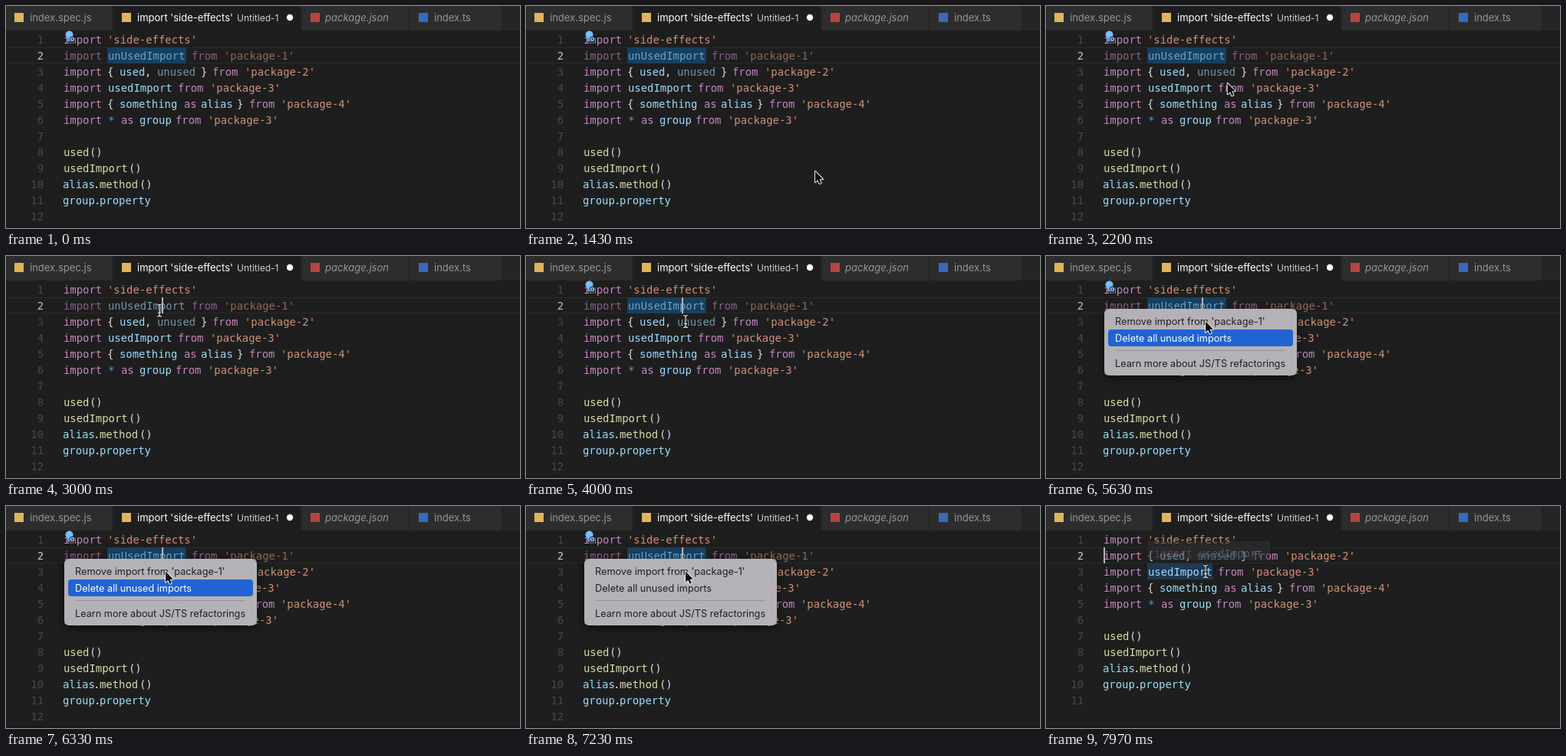
An HTML page with a canvas for the animation above (8000 ms loop, 670 px wide and 290 px high).

```html
<!DOCTYPE html>
<html lang="en">
<head>
<meta charset="utf-8">
<title>Remove unused imports</title>
<style>
  html, body { margin: 0; width: 100%; height: 100%; overflow: hidden; background: #1e1e1e; }
  canvas { display: block; width: 670px; height: 290px; }
</style>
</head>
<body>
<canvas id="stage"></canvas>
<script>
const W = 670, H = 290, LOOP = 8000, ROW = 21;
const CODE = '13.9px "DejaVu Sans Mono", monospace';
const UI = 'Inter, sans-serif';
const COLOR = { k: '#c586c0', s: '#ce9178', v: '#9cdcfe', f: '#dcdcaa', p: '#dcdcdc', o: '#569cd6' };

// Moments of the story, in ms
const ENTER = 1120, MOVE = 1600, ARRIVE = 2450, CLICK = 2850, MARK = 3110, BULB = 3170,
      OPEN = 4180, SECOND = 5500, BLINK = 7200, CLOSE = 7340, CLOSED = 7500, EDIT = 7600, HOVER = 7930;

// Tokens: x, text, colour key, optional "unused" flag
const LINES = [
  [[75, 'import', 'k'], [132, "'side-effects'", 's']],
  [[75, 'import', 'k', 1], [133, 'unUsedImport', 'v', 1], [242, 'from', 'k', 1], [284, "'package-1'", 's', 1]],
  [[75, 'import', 'k'], [132, '{', 'p'], [148, 'used', 'v'], [181, ',', 'p'], [197, 'unused', 'v', 1],
   [254, '}', 'p'], [269, 'from', 'k'], [311, "'package-2'", 's']],
  [[75, 'import', 'k'], [133, 'usedImport', 'v'], [224, 'from', 'k'], [266, "'package-3'", 's']],
  [[75, 'import', 'k'], [132, '{', 'p'], [148, 'something', 'v'], [232, 'as', 'k'], [254, 'alias', 'v'],
   [301, '}', 'p'], [317, 'from', 'k'], [358, "'package-4'", 's']],
  [[75, 'import', 'k'], [133, '*', 'o'], [150, 'as', 'k'], [174, 'group', 'v'], [221, 'from', 'k'],
   [263, "'package-3'", 's']],
  [],
  [[75, 'used', 'f'], [109, '()', 'p']],
  [[75, 'usedImport', 'f'], [160, '()', 'p']],
  [[74, 'alias', 'v'], [114, '.', 'p'], [122, 'method', 'f'], [174, '()', 'p']],
  [[74, 'group', 'v'], [115, '.', 'p'], [122, 'property', 'v']],
  []
];

const canvas = document.getElementById('stage');
const ctx = canvas.getContext('2d');
const ratio = window.devicePixelRatio || 1;
canvas.width = W * ratio;
canvas.height = H * ratio;

function rect(x, y, w, h, color) {
  ctx.fillStyle = color;
  ctx.fillRect(x, y, w, h);
}

function round(x, y, w, h, r, color) {
  ctx.fillStyle = color;
  ctx.beginPath();
  ctx.roundRect(x, y, w, h, r);
  ctx.fill();
}

function circle(x, y, r, color) {
  ctx.fillStyle = color;
  ctx.beginPath();
  ctx.arc(x, y, r, 0, 7);
  ctx.fill();
}

function text(string, x, y, font, color, align = 'left') {
  ctx.font = font;
  ctx.fillStyle = color;
  ctx.textAlign = align;
  ctx.fillText(string, x, y);
}

const clamp = v => Math.max(0, Math.min(1, v));
const progress = (t, from, to) => clamp((t - from) / (to - from));
const ease = p => p * p * (3 - 2 * p);
const mix = (a, b, p) => a + (b - a) * p;

function drawTabs() {
  rect(0, 0, W, 32, '#252526');
  const tab = (x, w, color, icon) => {
    rect(x, 0, w, 32, color);
    rect(x + 11, 9, 12, 12, icon);
  };
  tab(0, 138, '#2d2d2d', '#e0b45a');
  tab(140, 244, '#1e1e1e', '#e0b45a');
  tab(386, 139, '#2d2d2d', '#b8433f');
  tab(527, 118, '#2d2d2d', '#3b69c0');
  const label = '13px ' + UI;
  text('index.spec.js', 31, 19.5, label, '#969696');
  text("import 'side-effects'", 171, 19.5, label, '#ffffff');
  text('Untitled-1', 301, 19.5, '12px ' + UI, '#d0d0d0');
  circle(370, 15, 4.2, '#ffffff');
  text('package.json', 416, 19.5, 'italic ' + label, '#969696');
  text('index.ts', 558, 19.5, label, '#969696');
}

function drawCode(t) {
  const edited = t >= EDIT;
  const lines = edited ? LINES.filter((_, i) => i !== 1) : LINES;
  rect(0, 54, W, 1, '#2a2a2a');
  rect(0, 74, W, 1, '#2a2a2a');
  if (edited) rect(132, 75, 85, ROW, `rgba(38, 79, 120, ${0.55 * progress(t, HOVER - 60, HOVER)})`);
  else if (t < CLICK || t >= MARK) rect(132, 54, 103, ROW, '#163f60');
  lines.forEach((tokens, i) => {
    const y = 49 + i * ROW;
    text(i + 1, 49, y, CODE, i === 1 ? '#c6c6c6' : '#464646', 'right');
    for (const [x, string, key, unused] of tokens) {
      ctx.globalAlpha = unused ? 0.64 : 1;
      text(string, x, y, CODE, COLOR[key]);
    }
    ctx.globalAlpha = 1;
  });
  rect(0, 287, W, 3, '#191919');
}

function drawCaret(t) {
  if (t < CLICK) return;
  const edited = t >= EDIT;
  const blinkedOff = t < OPEN && Math.floor((t - CLICK) / 500) % 2;
  if (!blinkedOff) rect(edited ? 75 : 203, 54, 2, ROW, '#b4b4b2');
}

function drawBulb(t) {
  if ((t >= CLICK && t < BULB) || t >= EDIT) return;
  circle(82.5, 37.5, 5, '#75beff');
  rect(80.5, 41, 4, 5.5, '#75beff');
  circle(86.5, 43.5, 3.8, '#1e1e1e');
  circle(86.5, 43.5, 2.8, '#75beff');
  circle(86.5, 43.5, 1.1, '#1e1e1e');
}

function drawMenu(t) {
  if (t < OPEN || t >= CLOSED) return;
  ctx.globalAlpha = 1 - progress(t, CLOSE, CLOSED);
  ctx.shadowColor = 'rgba(0, 0, 0, 0.5)';
  ctx.shadowBlur = 12 * ratio;
  ctx.shadowOffsetY = 4 * ratio;
  round(76, 69, 251, 87, 6, '#b4b2b6');
  ctx.shadowColor = 'transparent';
  const blinkedOff = t >= BLINK && t < BLINK + 70;
  const selected = blinkedOff ? -1 : t < SECOND ? 0 : 1;
  if (selected >= 0) round(81, 74 + selected * 22, 241, 22, 4, '#2163d3');
  rect(90, 123, 223, 1, '#979599');
  const items = [["Remove import from 'package-1'", 90], ['Delete all unused imports', 112],
                 ['Learn more about JS/TS refactorings', 145]];
  items.forEach(([string, y], i) =>
    text(string, 90, y, '12.7px ' + UI, i === selected ? '#ffffff' : '#1f1e20'));
  ctx.globalAlpha = 1;
}

function drawTooltip(t) {
  if (t < HOVER) return;
  ctx.globalAlpha = 0.3 * progress(t, HOVER, HOVER + 40);
  rect(133, 46, 159, 25, '#454545');
  rect(134, 47, 157, 23, '#252526');
  text('import', 141, 67, CODE, '#c586c0');
  text('usedImport', 199, 67, CODE, '#9cdcfe');
  ctx.globalAlpha = 1;
}

function drawArrow(x, y) {
  ctx.save();
  ctx.translate(x, y);
  const shape = new Path2D('M0 0V14.2L3.3 11.2L5.6 16.2L7.7 15.3L5.6 10.3H10Z');
  ctx.lineWidth = 2;
  ctx.lineJoin = 'round';
  ctx.strokeStyle = '#f2f2f2';
  ctx.stroke(shape);
  ctx.fillStyle = '#0a0a0a';
  ctx.fill(shape);
  ctx.restore();
}

function drawBeam(x, y) {
  ctx.save();
  ctx.translate(x, y);
  const shape = new Path2D('M-3 -8Q0 -8 0 -6Q0 -8 3 -8M0 -6V6M-3 8Q0 8 0 6Q0 8 3 8M-2 3H2');
  for (const [width, color] of [[2.6, '#161616'], [1.2, '#e8e8e8']]) {
    ctx.lineWidth = width;
    ctx.strokeStyle = color;
    ctx.stroke(shape);
  }
  ctx.restore();
}

function drawPointer(t) {
  if (t < ENTER) return;
  const enter = ease(progress(t, ENTER, 1400));
  const travel = ease(progress(t, MOVE, ARRIVE));
  const settle = ease(progress(t, 3350, 3750));
  const x = mix(mix(mix(396, 377, enter), 200, travel), 208, settle);
  const y = mix(mix(mix(292, 216, enter), 71, travel), 85.5, settle);
  const arrow = t < ARRIVE || (t >= OPEN && t < CLOSED);
  if (arrow) drawArrow(x, y);
  else drawBeam(x, y);
}

function draw(now) {
  const t = now % LOOP;
  ctx.setTransform(ratio, 0, 0, ratio, 0, 0);
  rect(0, 0, W, H, '#1e1e1e');
  drawTabs();
  drawCode(t);
  drawCaret(t);
  drawBulb(t);
  drawMenu(t);
  drawTooltip(t);
  drawPointer(t);
  requestAnimationFrame(draw);
}
requestAnimationFrame(draw);
</script>
</body>
</html>
```
